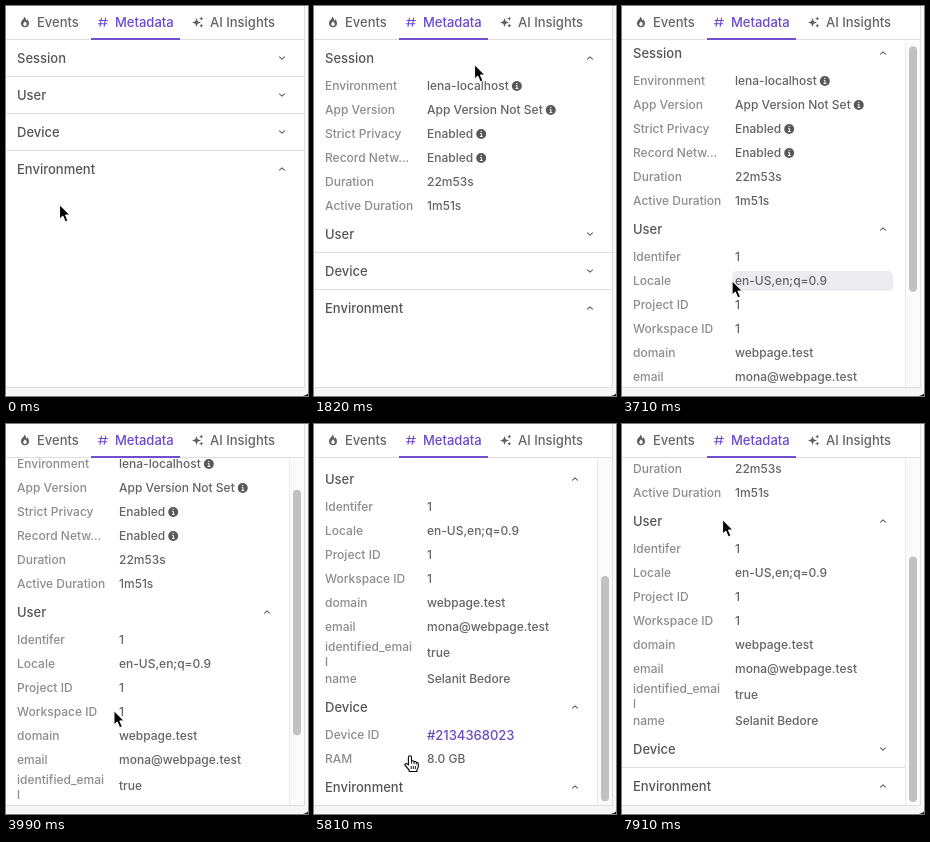
An HTML page for the animation above (8000 ms loop, 302 by 390 pixels).

```html
<!DOCTYPE html>
<html lang="en">
<head>
<meta charset="utf-8">
<title>Session metadata panel</title>
<style>
  html, body { margin: 0; width: 100%; height: 100%; overflow: hidden; background: #fff; }
  svg { display: block; }
  #stage { width: 100vw; height: 100vh; }
  text { font: 500 12px Inter, "Open Sans", sans-serif; fill: #646468; white-space: pre; }
  .tab, .title { font-size: 13px; fill: #555559; }
  .tab { fill: #646468; }
  .tab.on { fill: #6a4ac8; }
  .label { fill: #8c8c90; }
  .link { font-size: 13px; fill: #6a4ac0; }
  .line { fill: #dedede; }
  .hover { fill: #ecebef; }
  .chevron { fill: none; stroke: #646468; stroke-width: 1.1; stroke-linecap: round; stroke-linejoin: round; }
</style>
</head>
<body>
<svg id="stage" viewBox="0 0 302 390">
  <rect width="302" height="390" fill="#fff"/>
  <svg id="view" y="34" width="298" height="347"></svg>

  <g id="scrollbar">
    <rect x="283" y="35" width="15" height="346" fill="#fbfbfb"/>
    <rect x="283" y="35" width="1" height="346" fill="#e9e9e9"/>
    <rect id="thumb" x="287" width="8" rx="4" fill="#c1c1c1"/>
  </g>

  <rect x="299" width="3" height="390" fill="#f8f8f8"/>
  <rect x="298" width="1" height="382" class="line"/>
  <rect y="382" width="302" height="8" fill="#f6f6f6"/>
  <rect y="381" width="299" height="1" class="line"/>
  <path d="M302 387.5Q300.5 389.3 297 390H302Z" fill="#111"/>

  <rect y="33" width="298" height="1" class="line"/>
  <rect x="85" y="32" width="89" height="2" fill="#6f4fcb"/>
  <path d="M18.2 10.8C18.6 13 15 14 15 17.3A4 4 0 0 0 23 17.3C23 15.6 22.2 14.3 21.3 13.3C21 14.2 20.7 14.6 20.2 14.7C20.4 13 19.6 11.6 18.2 10.8ZM19 20A1.8 1.8 0 0 1 17.2 18.2C17.2 17 18.4 16.6 18.7 15.4C20 16.2 20.8 17.1 20.8 18.2A1.8 1.8 0 0 1 19 20Z" fill="#606064" fill-rule="evenodd"/>
  <path d="M95.4 12L94 20.3M99.6 12L98.2 20.3M93 14.5H101.4M92.4 17.7H100.8" fill="none" stroke="#6a4ac8" stroke-width="1.1" stroke-linecap="round"/>
  <path d="M190.5 12L191.7 15.3L195 16.5L191.7 17.7L190.5 21L189.3 17.7L186 16.5L189.3 15.3ZM195.3 10.5L195.9 12.1L197.5 12.7L195.9 13.3L195.3 14.9L194.7 13.3L193.1 12.7L194.7 12.1ZM195.3 17.5L195.9 19.1L197.5 19.7L195.9 20.3L195.3 21.9L194.7 20.3L193.1 19.7L194.7 19.1Z" fill="#606064"/>
  <text class="tab" x="31" y="21">Events</text>
  <text class="tab on" x="109" y="21">Metadata</text>
  <text class="tab" x="204" y="21">AI Insights</text>

  <g id="cursor" stroke="#fff" stroke-linejoin="round">
    <path id="arrow" d="M-.4 .8V15L2.8 12L5.3 17.8L7.9 16.7L5.4 11H9.8Z" fill="#000" stroke-width="1"/>
    <g id="hand" stroke="#000" stroke-width="1.1" fill="#fff">
      <path d="M-1.6 9V1.2Q-1.5 -.3 0 -.3Q1.4 -.3 1.5 1.2V5Q3.6 4.2 4 5.7Q6 5 6.3 6.5Q8.3 6.1 8.3 8.1V10.5Q8.1 12.3 6.9 13.8V15.5H-.8V14Q-2.8 12.2 -5 9.2Q-5.4 7.6 -3.9 7.5Q-2.9 7.5 -1.6 9Z"/>
      <path d="M1.5 5V7.7M4 5.8V8M6.3 6.7V8.5M1.2 10V13M3.3 10V13M5.4 10V13" fill="none" stroke-width=".9"/>
    </g>
  </g>
</svg>

<script>
const LOOP = 8000, TOP = 34, VIEW = 348, HEAD = 37, TOGGLE = 200;
const TRACK = { top: 36.5, length: 341.5 };
const $ = id => document.getElementById(id);

// Rows: label, value, options. Toggles: times when the section opens or closes.
const sections = [
  { title: 'Session', height: 139, toggles: [1200], rows: [
    ['Environment', 'lena-localhost', { info: true }],
    ['App Version', 'App Version Not Set', { info: true }],
    ['Strict Privacy', 'Enabled', { info: true }],
    ['Record Netw...', 'Enabled', { info: true }],
    ['Duration', '22m53s'],
    ['Active Duration', '1m51s']] },
  { title: 'User', height: 191, toggles: [2940], rows: [
    ['Identifer', '1'],
    ['Locale', 'en-US,en;q=0.9'],
    ['Project ID', '1'],
    ['Workspace ID', '1'],
    ['domain', 'webpage.test'],
    ['email', 'mona@webpage.test'],
    ['identified_emai', 'true', { tail: 'l' }],
    ['name', 'Selanit Bedore']] },
  { title: 'Device', height: 43, toggles: [5040, 6760], rows: [
    ['Device ID', '#2134368023', { link: true }],
    ['RAM', '8.0 GB']] },
  { title: 'Environment', height: 0, toggles: [-TOGGLE], rows: [] },
];

const cursorKeys = [
  [0, 54, 198], [300, 54, 198], [1050, 164, 55], [1820, 161, 58], [2100, 161, 58],
  [2680, 107.5, 231], [3050, 107.5, 231], [3480, 110.5, 274], [3800, 110.5, 274],
  [4500, 99, 339], [4900, 99, 339], [5250, 96, 332], [5950, 96, 332],
  [6450, 97, 288], [6900, 97, 288], [7500, 101, 95], [LOOP, 101, 95],
];
const scrollKeys = [[0, 0], [3580, 0], [4690, 130], [5300, 130], [5720, 173], [LOOP, 173]];
const handTime = [5000, 6850];

const clamp = (v, lo = 0, hi = 1) => Math.min(hi, Math.max(lo, v));
const ease = p => p * p * (3 - 2 * p);

function sample(keys, t) {
  const i = Math.max(1, keys.findIndex(k => k[0] >= t));
  const [a, b] = [keys[i - 1], keys[i]];
  const p = ease(clamp((t - a[0]) / (b[0] - a[0])));
  return a.slice(1).map((v, n) => v + (b[n + 1] - v) * p);
}

function add(parent, tag, attrs = {}, text = '') {
  const el = document.createElementNS('http://www.w3.org/2000/svg', tag);
  for (const key in attrs) el.setAttribute(key, attrs[key]);
  el.textContent = text;
  return parent.appendChild(el);
}

function addRow(body, [label, value, opts = {}], y) {
  const hover = add(body, 'rect', { class: 'hover', x: 110, y: y - 10, height: 20, rx: 5 });
  const labelY = opts.tail ? y - 2 : y + 4;
  add(body, 'text', { class: 'label', x: 11, y: labelY }, label);
  if (opts.tail) add(body, 'text', { class: 'label', x: 11, y: labelY + 15 }, opts.tail);
  const text = add(body, 'text', opts.link ? { x: 113, y: y + 5, class: 'link' } : { x: 113, y: y + 4 }, value);
  if (opts.info) {
    const x = 113 + text.getComputedTextLength() + 8;
    add(body, 'circle', { cx: x, cy: y, r: 5, fill: '#58585c' });
    add(body, 'path', { d: `M${x - 1} ${y - .6}h1.2v3m-1.5 0h2.8M${x - .6} ${y - 2.6}h1.2`, fill: 'none', stroke: '#fff', 'stroke-width': 1 });
  }
  return { y, hover };
}

for (const s of sections) {
  s.group = add($('view'), 'g');
  add(s.group, 'text', { class: 'title', x: 11, y: 23 }, s.title);
  s.chevron = add(s.group, 'path', { class: 'chevron', d: 'M-2.5 -1.2L0 1.2L2.5 -1.2' });
  s.line = add(s.group, 'rect', { class: 'line', y: 36, height: 1 });
  s.body = add(s.group, 'svg', { y: HEAD, width: 298, height: s.height });
  let y = 9;
  s.cells = s.rows.map(row => {
    const tall = row[2]?.tail ? 2 : 0;
    const cell = addRow(s.body, row, y += tall);
    y += 24 + tall;
    return cell;
  });
}

const show = (el, on) => el.setAttribute('visibility', on ? 'inherit' : 'hidden');

function openness(s, t) {
  return s.toggles.reduce((open, at) => {
    const p = ease(clamp((t - at) / TOGGLE));
    return open + (open > .5 ? -p : p);
  }, 0);
}

function render(t) {
  const [cx, cy] = sample(cursorKeys, t);
  const open = sections.map(s => openness(s, t));
  const total = sections.reduce((sum, s, i) => sum + HEAD + s.height * open[i], 1);
  const maxScroll = Math.max(0, total - VIEW);
  const overflow = maxScroll > 0;
  const right = overflow ? 283 : 298;
  const scroll = Math.round(clamp(sample(scrollKeys, t)[0], 0, maxScroll));

  let y = -scroll;
  sections.forEach((s, i) => {
    const height = s.height * open[i];
    const expanded = s.toggles.filter(at => t >= at).length % 2 === 1;
    s.group.setAttribute('transform', `translate(0 ${y})`);
    s.chevron.setAttribute('transform', `translate(${right - 22} 18) scale(1 ${expanded ? -1 : 1})`);
    s.line.setAttribute('width', right);
    show(s.line, !expanded);
    show(s.body, height > 0);
    s.body.setAttribute('height', height);
    for (const cell of s.cells) {
      const rowY = TOP + y + HEAD + cell.y;
      cell.hover.setAttribute('width', right - 122);
      show(cell.hover, height > cell.y && cx >= 109 && Math.abs(cy - rowY) < 12);
    }
    y += HEAD + height;
  });

  show($('scrollbar'), overflow);
  if (overflow) {
    const thumbHeight = VIEW / total * 338;
    $('thumb').setAttribute('height', thumbHeight);
    $('thumb').setAttribute('y', TRACK.top + scroll / maxScroll * (TRACK.length - thumbHeight));
  }

  const hand = t >= handTime[0] && t < handTime[1];
  $('cursor').setAttribute('transform', `translate(${cx} ${cy})`);
  show($('hand'), hand);
  show($('arrow'), !hand);
}

const start = performance.now();
function tick() {
  render((performance.now() - start) % LOOP);
  requestAnimationFrame(tick);
}
tick();
</script>
</body>
</html>
```
